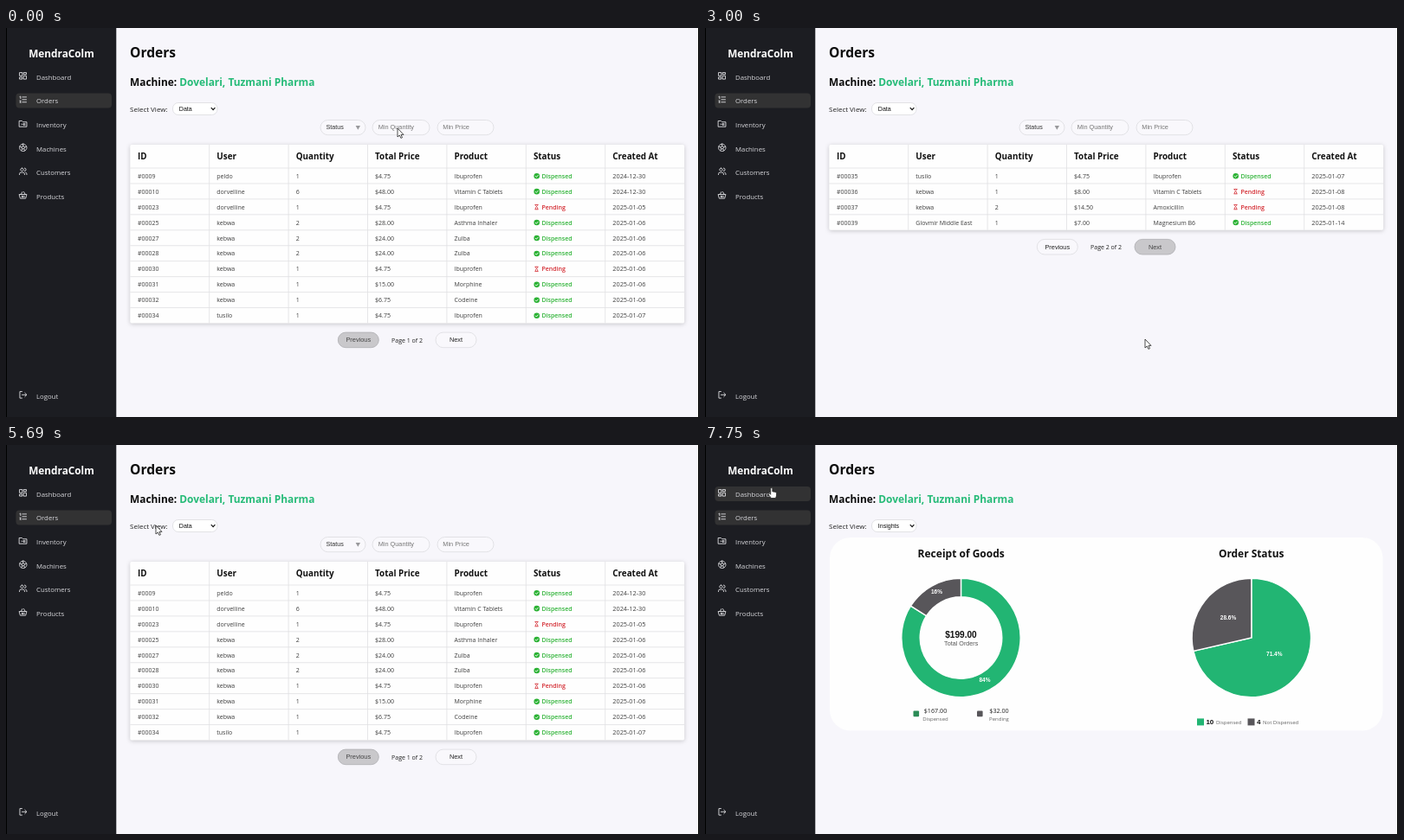
Recreate the animation shown at these times as an HTML page. Size 800 px wide and 450 px high, loop 8000 ms.

```html
<!DOCTYPE html>
<html lang="en">
<head>
<meta charset="utf-8">
<title>Orders</title>
<style>
html, body { margin: 0; width: 100%; height: 100%; overflow: hidden; background: #f7f6fb; }
svg { display: block; width: 100%; height: 100%; }
text { font-family: "Open Sans", "Noto Sans", sans-serif; white-space: pre; }
.arial { font-family: "Liberation Sans", Arial, sans-serif; }
.b { font-weight: 700; }
.sb { font-weight: 600; }
.mid { text-anchor: middle; }
.icon { fill: none; stroke: #e4e4e8; stroke-width: 2.1; stroke-linecap: round; stroke-linejoin: round; }
.card { fill: #fefefe; filter: drop-shadow(0 1.5px 2.5px rgba(0, 0, 0, .2)); }
</style>
</head>
<body>
<svg id="stage" viewBox="0 0 800 450" xmlns="http://www.w3.org/2000/svg"></svg>
<script>
const LOOP = 8000, STEP = 62.5;
const GREEN = '#22b573', GREY = '#58565a', OK = '#2bb234', BAD = '#d3282f', CELL = '#3e3e3e';

const text = (x, y, size, str, fill = '#111', cls = '', extra = '') =>
  `<text x="${x}" y="${y}" font-size="${size}" fill="${fill}" class="${cls}" ${extra}>${str}</text>`;
const rect = (x, y, w, h, r, fill, extra = '') =>
  `<rect x="${x}" y="${y}" width="${w}" height="${h}" rx="${r}" fill="${fill}" ${extra}/>`;
const line = (x1, y1, x2, y2) => `<path d="M${x1} ${y1}L${x2} ${y2}" stroke="#e0e0e3" stroke-width=".8"/>`;
const pill = (x, y, w, h, fill = '#f9f8fc', edge = '#dcdce0') =>
  rect(x, y, w, h, h / 2, fill, `stroke="${edge}" stroke-width=".8"`);

// Sidebar
const nav = [
  ['Dashboard', 56.5, 'M3 3h7v9H3zM14 3h7v5h-7zM14 12h7v9h-7zM3 16h7v5H3z'],
  ['Orders', 84, 'M10 5h11M10 12h11M10 19h11M3 4l2-1v6M3 15h3l-3 5h3'],
  ['Inventory', 112, 'M2 4h7l3 3h10v13H2zM8 13h3M14 11v5M17 11v5'],
  ['Machines', 139.5, 'M12 2a10 10 0 1 0 .1 0M12 8a4 4 0 1 0 .1 0M12 2v6M3 9l5 2M21 9l-5 2M7 20l3-5M17 20l-3-5'],
  ['Customers', 167, 'M9 3a4 4 0 1 0 .1 0M2 21v-2a4 4 0 0 1 4-4h6a4 4 0 0 1 4 4v2M16 3a4 4 0 0 1 0 8M22 21v-2a4 4 0 0 0-3-4'],
  ['Products', 194.5, 'M2 10h20l-3 11H5zM6 10l4-7M18 10l-4-7M9 14v4M12 14v4M15 14v4'],
  ['Logout', 425.5, 'M9 3H3v18h6M9 12h12M17 7l5 5-5 5']
];

function sidebar() {
  return rect(0, 0, 127.3, 450, 0, '#1c1d22') +
    text(64, 34, 11.8, 'MendraColm', '#fff', 'b mid') +
    nav.map(([label, y, d], i) =>
      rect(11.5, y - 8.5, 110.5, 17, 4, '#323233', `id="nav${i}"`) +
      `<path class="icon" d="${d}" transform="translate(14.7 ${y - 6.2}) scale(.42)"/>` +
      text(35, y + 3.1, 7.8, label, '#d8d8dc')).join('');
}

// Orders table: id, user, quantity, price, product, pending, date
const users = { p: 'peldo', d: 'dorvelline', k: 'kebwa', t: 'tusilo', g: 'Glovmir Middle East' };
const parse = s => s.split(';').map(r => r.split(','));
const pages = [
  parse('09,p,1,4.75,Ibuprofen,,24-12-30;010,d,6,48.00,Vitamin C Tablets,,24-12-30;' +
    '023,d,1,4.75,Ibuprofen,x,25-01-05;025,k,2,28.00,Asthma Inhaler,,25-01-06;' +
    '027,k,2,24.00,Zulba,,25-01-06;028,k,2,24.00,Zulba,,25-01-06;' +
    '030,k,1,4.75,Ibuprofen,x,25-01-06;031,k,1,15.00,Morphine,,25-01-06;' +
    '032,k,1,6.75,Codeine,,25-01-06;034,t,1,4.75,Ibuprofen,,25-01-07'),
  parse('035,t,1,4.75,Ibuprofen,,25-01-07;036,k,1,8.00,Vitamin C Tablets,x,25-01-08;' +
    '037,k,2,14.50,Amoxicillin,x,25-01-08;039,g,1,7.00,Magnesium B6,,25-01-14')
];
const heads = ['ID', 'User', 'Quantity', 'Total Price', 'Product', 'Status', 'Created At'];
const LEFT = 143.3, TOP = 135, HEAD = 27, ROW = 17.95, COL = 91.4;
const colX = i => LEFT + COL * i;

function status(x, y, pending) {
  const icon = pending
    ? `<path d="M1.6-2.7H5.6M1.6 2.7H5.6M2.2-2.7C2.2-.8 5-.8 5 2.7M5-2.7C5-.8 2.2-.8 2.2 2.7" transform="translate(${x} ${y})" fill="none" stroke="${BAD}" stroke-width=".8"/>`
    : `<circle cx="${x + 3.8}" cy="${y}" r="3.3" fill="${OK}"/><path d="M${x + 2.2} ${y}l1.2 1.3 2.2-2.4" fill="none" stroke="#fff" stroke-width=".9"/>`;
  return icon + text(x + 9.5, y + 2.5, 7, pending ? 'Pending' : 'Dispensed', pending ? BAD : OK, 'sb');
}

function button(x, y, label, off) {
  return pill(x, y - 8.8, 47, 17.6, off ? '#c9c8cb' : '#f9f8fc', off ? '#aeaeb1' : '#dcdce0') +
    text(x + 23.5, y + 2.5, 7.4, label, off ? '#444' : '#222', 'arial mid');
}

function table(rows, page) {
  const h = HEAD + ROW * rows.length, end = TOP + h, by = end + 19.4;
  let s = `<rect class="card" x="${LEFT}" y="${TOP}" width="${COL * 7}" height="${h}" rx="2"/>`;
  heads.forEach((t, i) => {
    s += text(colX(i) + 8.6, 152.4, 9.85, t, '#111', 'b');
    if (i) s += line(colX(i), TOP, colX(i), end);
  });
  rows.forEach(([id, user, qty, price, product, pending, date], r) => {
    const y = TOP + HEAD + ROW * r, mid = y + 9.2;
    s += line(LEFT, y, colX(7), y);
    ['#00' + id, users[user], qty, '$' + price, product].forEach((t, i) => {
      s += text(colX(i) + 8.6, mid + 2.5, 7, t, CELL);
    });
    s += status(colX(5) + 8.6, mid, pending) +
      text(colX(6) + 8.6, mid + 2.5, 7.3, '20' + date, CELL);
  });
  return s + button(383.3, by, 'Previous', page === 1) +
    text(463, by + 2.8, 7, `Page ${page} of 2`, '#222', 'mid') +
    button(496, by, 'Next', page === 2);
}

function filters() {
  return pill(363, 106.5, 52, 17.2) + text(369.5, 117.4, 7.2, 'Status', '#333', 'arial') +
    '<path d="M403.6 113h5.4l-2.7 4.8z" fill="#99999c"/>' +
    pill(423, 106.5, 66, 17.2) + text(429.7, 117.4, 7.35, 'Min Quantity', '#777', 'arial') +
    pill(498, 106.5, 65, 17.2) + text(504.3, 117.4, 7.35, 'Min Price', '#777', 'arial');
}

// Charts
function slice(cx, cy, r, hole, from, to, fill) {
  const p = (a, q) => `${cx + q * Math.sin(a * 2 * Math.PI)} ${cy - q * Math.cos(a * 2 * Math.PI)}`;
  const big = to - from > .5 ? 1 : 0;
  const inner = hole ? `L${p(to, hole)}A${hole} ${hole} 0 ${big} 0 ${p(from, hole)}` : `L${cx} ${cy}`;
  return `<path d="M${p(from, r)}A${r} ${r} 0 ${big} 1 ${p(to, r)}${inner}Z" fill="${fill}" stroke="#fff" stroke-width="1.4"/>`;
}

function ring(cx, hole, share) {
  return slice(cx, 223, 68.7, hole, 0, share, GREEN) + slice(cx, 223, 68.7, hole, share, 1, GREY);
}

function insights() {
  const tag = (x, y, t) => text(x, y + 2.3, 6.5, t, '#fff', 'arial b mid');
  const amount = (x, value, label, fill) => rect(x - 25.5, 307.5, 6.6, 6.8, 1, fill) +
    text(x, 309.8, 7.2, value, '#222', 'mid') + text(x, 318.9, 6, label, '#666', 'mid');
  const count = (x, n, w, label, fill) => rect(x, 316.4, 8, 8, 0, fill) +
    text(x + 10.4, 323.3, 8, n, '#111', 'arial b') + text(x + w, 322.7, 6, label, '#666');
  return rect(144, 107, 638.5, 223.5, 24, '#fefefe') +
    text(295.7, 130, 12, 'Receipt of Goods', '#111', 'b mid') +
    text(630.7, 130, 11.9, 'Order Status', '#111', 'b mid') +
    ring(295.5, 47.3, .84) + tag(323, 271.3, '84%') + tag(267.5, 169.3, '16%') +
    text(295.5, 222.8, 10.1, '$199.00', '#111', 'arial b mid') +
    text(295.7, 232, 7.2, 'Total Orders', '#555', 'arial mid') +
    amount(266, '$167.00', 'Dispensed', '#2c8c57') + amount(339.5, '$32.00', 'Pending', GREY) +
    ring(630.8, 0, .714) + tag(657.3, 241.7, '71.4%') + tag(604, 199.5, '28.6%') +
    count(568, '10', 22, 'Dispensed', GREEN) + count(626.5, '4', 17.5, 'Not Dispensed', GREY);
}

function header() {
  return text(143, 33.8, 15.6, 'Orders', '#0c0c0c', 'b') +
    text(143, 67.2, 11.9, 'Machine:', '#0c0c0c', 'b') +
    text(200.3, 67.2, 11.9, 'Dovelari, Tuzmani Pharma', '#26bb78', 'b') +
    text(143, 96.8, 8, 'Select View:', '#222') +
    rect(192.5, 86.5, 51.5, 14, 6.5, '#fff', 'stroke="#dcdce0" stroke-width=".8"') +
    text(199.8, 95.9, 7.05, 'Data', '#111', 'arial', 'id="view"') +
    '<path d="M236.8 92.2l2.3 2.4 2.3-2.4" fill="none" stroke="#111" stroke-width="1.2"/>';
}

const edges = rect(0, 0, 1, 450, 0, '#000') + rect(799, 0, 1, 450, 0, '#000');

const pointer = `<g id="pointer" stroke="#222" stroke-width=".8" stroke-linejoin="round" fill="#fff">
  <path id="arrow" d="M0 0V10L2.3 8 3.9 11.4 5.5 10.7 4 7.4H7Z"/>
  <path id="hand" d="M-1.1 1.2C-1.1-.4 1.1-.4 1.1 1.2V4.6C1.5 4 2.6 4.1 2.8 4.9 3.4 4.4 4.2 4.6 4.4 5.3 5 5 5.8 5.3 5.8 6.2V8.6C5.8 10 5 10.6 4.8 12H-.6C-1.2 10-3.4 8.6-3.7 7.2-3.7 6.2-2.3 6.2-1.1 7.8Z"/></g>`;

const $ = id => document.getElementById(id);
$('stage').innerHTML = rect(0, 0, 800, 450, 0, '#f7f6fb') + sidebar() + header() +
  `<g id="filters">${filters()}</g><g id="page1">${table(pages[0], 1)}</g>` +
  `<g id="page2">${table(pages[1], 2)}</g><g id="insights">${insights()}</g>` + edges + pointer;

// Pointer path: time, x, y
const path = [
  [0, 452, 116], [187, 498, 81], [375, 498, 81], [1187, 514.5, 360], [2625, 514.5, 360],
  [2700, 508, 360], [3000, 508, 360], [3437, 402, 251], [3875, 406, 252], [4187, 406, 252],
  [4750, 160, 154.5], [5000, 163, 130], [5687, 173, 93], [5812, 175, 92], [5937, 207, 92],
  [6250, 207, 92], [6437, 213, 124], [6812, 213, 124], [7625, 76.8, 49.5], [LOOP, 76.8, 49.5]
];

function pointerAt(t) {
  const i = Math.max(1, path.findIndex(p => p[0] >= t));
  const [t0, x0, y0] = path[i - 1], [t1, x1, y1] = path[i];
  const k = (t - t0) / (t1 - t0), e = k * k * (3 - 2 * k);
  return [x0 + (x1 - x0) * e, y0 + (y1 - y0) * e];
}

const show = (id, on) => $(id).setAttribute('visibility', on ? 'visible' : 'hidden');

function draw(now) {
  const t = Math.floor((now % LOOP + 3) / STEP) * STEP % LOOP;
  const charts = t >= 6687, second = t >= 2687 && t < 4250;
  const [x, y] = pointerAt(t);
  const inside = (l, top, w, h) => x >= l && x <= l + w && y >= top && y <= top + h;

  show('page1', !charts && !second);
  show('page2', second);
  show('insights', charts);
  show('filters', !charts);
  $('view').textContent = charts ? 'Insights' : 'Data';

  let hand = !charts && (second ? inside(383, 244, 47, 18) : inside(496, 352, 47, 18));
  nav.forEach(([, cy], i) => {
    const over = inside(11, cy - 8.5, 111, 17);
    hand = hand || over;
    show('nav' + i, over || i === 1);
  });
  show('hand', hand);
  show('arrow', !hand);
  $('pointer').setAttribute('transform', `translate(${x.toFixed(2)} ${y.toFixed(2)})`);
}

const start = performance.now();
function tick() {
  draw(performance.now() - start);
  requestAnimationFrame(tick);
}
tick();
</script>
</body>
</html>
```
